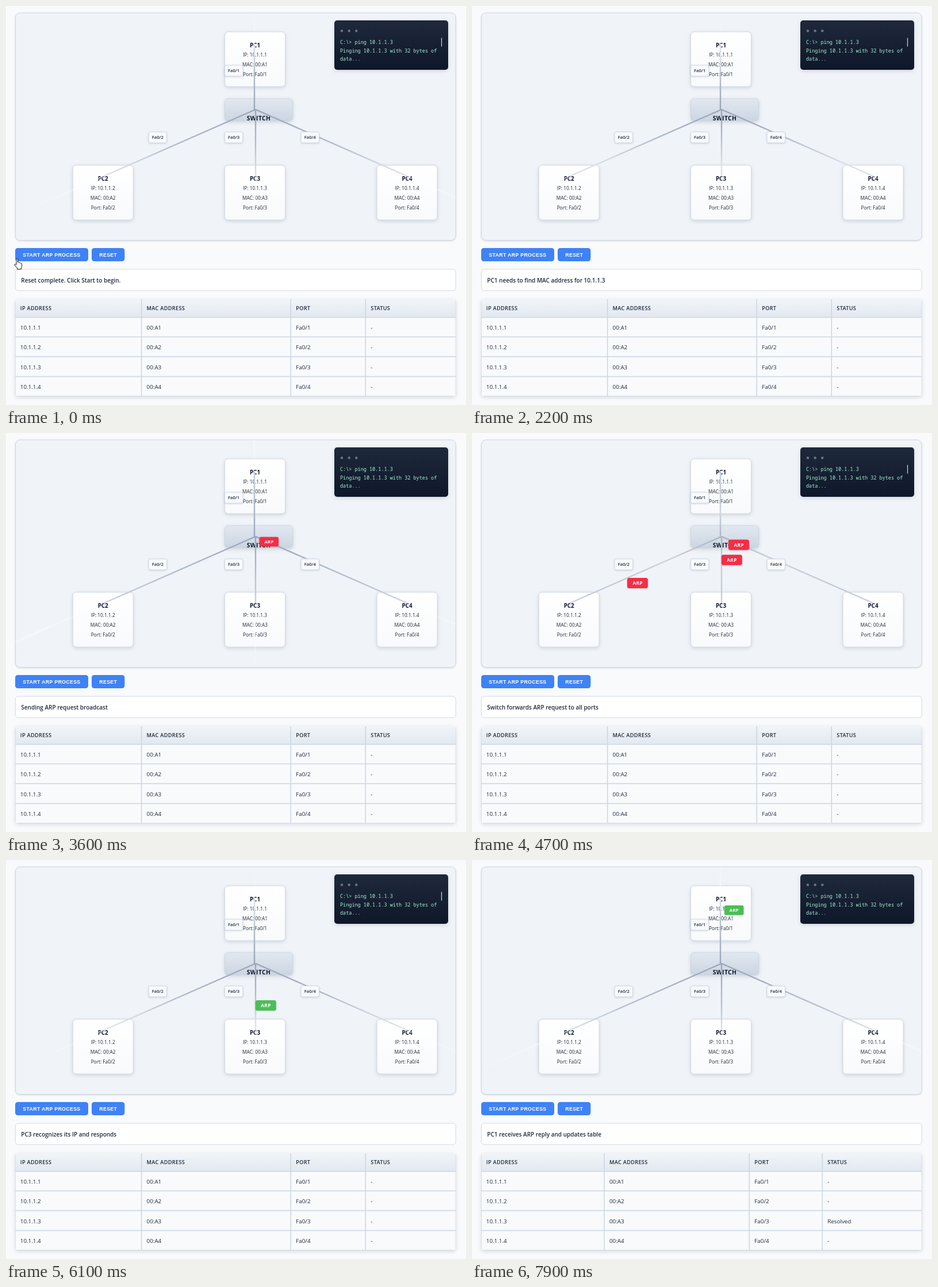
Recreate the animation shown at these times as an HTML page. Size 800 by 694 pixels, loop 8 s.

```html
<!DOCTYPE html>
<html lang="en">
<head>
<meta charset="utf-8">
<title>ARP process</title>
<style>
html, body { margin: 0; width: 100%; height: 100%; overflow: hidden; background: #f8fafc; }
svg { display: block; }
text { font-family: "Open Sans", "Noto Sans", sans-serif; fill: #1e293b; white-space: pre; }
.mid { text-anchor: middle; }
.name { font-size: 9.9px; font-weight: 700; fill: #0f172a; }
.info { font-size: 8.3px; }
.hub { font-size: 10.3px; font-weight: 700; letter-spacing: .4px; fill: #0f172a; }
.port { font-size: 7.6px; font-weight: 600; }
.btn { font: bold 8.8px "Liberation Sans", Arial, sans-serif; letter-spacing: .33px; fill: #fff; }
.status { font-size: 10px; font-weight: 600; }
.head { font-size: 9.2px; font-weight: 600; letter-spacing: .3px; }
.cell { font-size: 9.8px; }
.term { font: 8.5px "Noto Sans Mono", "DejaVu Sans Mono", monospace; fill: #a7f3d0; }
.arp { font-size: 8.3px; font-weight: 700; letter-spacing: .33px; fill: #fff; }
.box { stroke: #cbd5e1; stroke-width: .9; }
.rule { stroke: #cbd5e1; stroke-width: 1.5; }
.soft { filter: drop-shadow(0 1px 1.5px rgba(15, 23, 42, .15)); }
.lift { filter: drop-shadow(0 2px 3px rgba(15, 23, 42, .14)); }
</style>
</head>
<body>
<svg id="stage" width="800" height="694" viewBox="0 0 800 694"></svg>
<script>
const LOOP = 8000, STEP = 1500, FIRST = 1130, FLIGHT = 1000;
const RED = '#f52d46', GREEN = '#4abf55';
const MESSAGES = [
  'Reset complete. Click Start to begin.',
  'PC1 needs to find MAC address for 10.1.1.3',
  'Sending ARP request broadcast',
  'Switch forwards ARP request to all ports',
  'PC3 recognizes its IP and responds',
  'PC1 receives ARP reply and updates table'
];
const CARDS = [[380.5, 45], [116.2, 277], [380.5, 277], [645, 277]];
const LINKS = [[432, 180, 432, 66], [434, 180, 170, 296], [434, 180, 434, 296], [434, 180, 698, 296]];
const TAGS = [[380.3, 103], [248, 219], [380.3, 219], [513, 219]];

// Packet stops, and each flight as [start, from, to, colour]
const HUB = [451.8, 189.2], STOPS = [[450, 75], [187.8, 305], [451.8, 305], [715.8, 305]];
const FLIGHTS = [
  [2630, STOPS[0], HUB, RED],
  [4130, HUB, STOPS[1], RED],
  [4340, HUB, STOPS[2], RED],
  [4550, HUB, STOPS[3], RED],
  [5630, STOPS[2], HUB, GREEN],
  [7130, HUB, STOPS[0], GREEN]
];

const text = (cls, x, y, s, extra = '') => `<text class="${cls}" x="${x}" y="${y}" ${extra}>${s}</text>`;
const rect = (x, y, w, h, r, fill, cls = '') =>
  `<rect x="${x}" y="${y}" width="${w}" height="${h}" rx="${r}" fill="${fill}" class="${cls}"/>`;
const gradient = (id, stops, down = true) =>
  `<linearGradient id="${id}" x2="${down ? 0 : 1}" y2="${down ? 1 : 0}">` +
  stops.map(([color, alpha = 1], i) =>
    `<stop offset="${i / (stops.length - 1)}" stop-color="${color}" stop-opacity="${alpha}"/>`).join('') +
  '</linearGradient>';

const card = ([x, y], i) => {
  const n = i + 1, cx = x + 52.5;
  return rect(x, y, 105, 95.2, 6, 'url(#card)', 'box lift') +
    text('name mid', cx, y + 26.5, 'PC' + n) +
    text('info mid', cx, y + 43, 'IP: 10.1.1.' + n) +
    text('info mid', cx, y + 60.3, 'MAC: 00:A' + n) +
    text('info mid', cx, y + 77.3, 'Port: Fa0/' + n);
};

const link = ([x1, y1, x2, y2]) => {
  const length = Math.hypot(x2 - x1, y2 - y1), angle = Math.atan2(y2 - y1, x2 - x1) * 180 / Math.PI;
  const bar = (fill, cls) => rect(0, -1.2, length, 2.4, 0, fill, cls);
  return `<g transform="translate(${x1} ${y1}) rotate(${angle})">` +
    bar('url(#wire)') + bar('url(#sheen)', 'sheen') + '</g>';
};

const tag = ([x, y], i) =>
  rect(x, y, 31.6, 19, 3, '#f8fafc', 'box soft') + text('port mid', x + 15.8, y + 12.3, 'Fa0/' + (i + 1));

const rowY = [563, 597.4, 631.6, 666];
const table = (cols, resolved) => {
  const starts = [15.8, ...cols];
  const column = (title, k, value) => text('head', starts[k] + 9, 528.6, title) +
    rowY.map((y, i) => text('cell', starts[k] + 9, y, value(i + 1))).join('');
  return cols.map(x => `<path class="rule" d="M${x} 510V679"/>`).join('') +
    column('IP ADDRESS', 0, n => '10.1.1.' + n) +
    column('MAC ADDRESS', 1, n => '00:A' + n) +
    column('PORT', 2, n => 'Fa0/' + n) +
    column('STATUS', 3, n => resolved && n === 3 ? 'Resolved' : '-');
};

const stage = document.getElementById('stage');
stage.innerHTML = `<defs>
  ${gradient('card', [['#ffffff'], ['#f8fafc']])}
  ${gradient('hubFill', [['#e2e8f0'], ['#cbd5e1']])}
  ${gradient('headFill', [['#f1f5f9'], ['#e2e8f0']])}
  ${gradient('termFill', [['#1e293b'], ['#0f172a']])}
  ${gradient('wire', [['#98a4b9'], ['#c9d2de']], false)}
  ${gradient('sheen', [['#fff', 0], ['#fff', .45], ['#fff', 0]], false)}
  <clipPath id="panel">${rect(16, 12, 766, 396, 8, '#000')}</clipPath>
  <clipPath id="sheet">${rect(16, 510, 766.5, 169, 5, '#000')}</clipPath>
  </defs>` +
  rect(0, 0, 800, 694, 0, '#f8fafc') +
  rect(16.5, 12, 765.5, 395.5, 8, '#f0f4f8', 'box soft') +
  CARDS.map(card).join('') +
  rect(380.5, 161, 118.3, 39, 6, 'url(#hubFill)', 'box lift') +
  text('hub mid', 439.5, 198.8, 'SWITCH') +
  rect(571, 25, 198, 86, 5, 'url(#termFill)', 'lift') +
  [584, 596.7, 609.3].map(x => `<circle cx="${x}" cy="43.3" r="2.2" fill="#6b7280"/>`).join('') +
  text('term', 581, 66, 'C:\\&gt; ping 10.1.1.3') +
  text('term', 581, 80.8, 'Pinging 10.1.1.3 with 32 bytes of') +
  text('term', 581, 95.3, 'data...') +
  '<path id="caret" d="M757.5 55.5V70.5" stroke="#a7f3d0" stroke-width="1.2"/>' +
  `<g clip-path="url(#panel)">${LINKS.map(link).join('')}</g>` +
  TAGS.map(tag).join('') +
  FLIGHTS.map(f => '<g class="packet">' + rect(-18, -9, 36, 18, 3.5, f[3], 'soft') +
    text('arp mid', .2, 3, 'ARP') + '</g>').join('') +
  rect(16, 421, 127, 23, 4.5, '#3f82f5') + text('btn', 29.3, 436, 'START ARP PROCESS') +
  rect(149, 421, 57.3, 23, 4.5, '#3f82f5') + text('btn', 162.3, 436, 'RESET') +
  rect(16.3, 458, 765.9, 37, 5, '#fff', 'box') +
  text('status', 26.3, 480.5, '', 'id="status"') +
  rect(16, 510, 766.5, 169, 5, '#f8fafc', 'lift') +
  `<g clip-path="url(#sheet)">${rect(16, 510, 766.5, 31.5, 0, 'url(#headFill)')}
    <path class="rule" d="M16 541.6h767M16 575.6h767M16 609.8h767M16 644.4h767"/>
    <path class="box" d="M16.2 510v169M782.2 510v169M16 678.7h767"/>
    <g id="before">${table([235.6, 495.2, 625.3], false)}</g>
    <g id="after">${table([230, 482.3, 609.3], true)}</g></g>` +
  `<path id="pointer" transform="translate(14 439)" fill="#fff" stroke="#111" stroke-width="1" stroke-linejoin="round"
    d="M4 11V2q0-1.5 1.3-1.5T6.600 2v5q2-.9 2.500.7 2-.6 2.400.8 2-.2 2 1.700v3.600q0 2-1.200 3v2H5.600v-1.800L1.300 12q-.9-1.500.3-2 1-.3 2.400 1z"/>`;

const byId = id => document.getElementById(id);
const show = (el, on) => el.style.display = on ? '' : 'none';
const packets = [...stage.querySelectorAll('.packet')];
const sheens = [...stage.querySelectorAll('.sheen')];

// CSS ease-in-out, cubic-bezier(.42, 0, .58, 1)
function easeInOut(u) {
  let lo = 0, hi = 1;
  for (let i = 0; i < 20; i++) {
    const s = (lo + hi) / 2;
    const x = 3 * s * (1 - s) * (.42 * (1 - s) + .58 * s) + s ** 3;
    if (x < u) lo = s; else hi = s;
  }
  return lo * lo * (3 - 2 * lo);
}

function draw(t) {
  const step = Math.max(0, Math.floor((t - FIRST) / STEP) + 1);
  byId('status').textContent = MESSAGES[step];
  show(byId('before'), step < 5);
  show(byId('after'), step === 5);
  show(byId('pointer'), t < 1000);
  show(byId('caret'), (t + 95) % 750 < 375);

  // The sheen runs from the far end of each wire back past the switch
  const offset = 1 - 2 * ((t + 450) % 2000) / 2000;
  sheens.forEach(el => el.setAttribute('x', offset * el.width.baseVal.value));

  FLIGHTS.forEach(([start, from, to], i) => {
    const u = (t - start) / FLIGHT, el = packets[i];
    show(el, u >= 0 && u < 1);
    if (u < 0 || u >= 1) return;
    const f = easeInOut(u), k = Math.min(1, Math.max(0, (u - .58) / .18)), settle = k * k * (3 - 2 * k);
    const x = from[0] + (to[0] - from[0]) * f + 5.5 * settle;
    const y = from[1] + (to[1] - from[1]) * f;
    el.setAttribute('transform', `translate(${x} ${y}) scale(${1 - .07 * settle})`);
  });
}

const begin = performance.now();
function tick() {
  draw((performance.now() - begin) % LOOP);
  requestAnimationFrame(tick);
}
tick();
</script>
</body>
</html>
```
